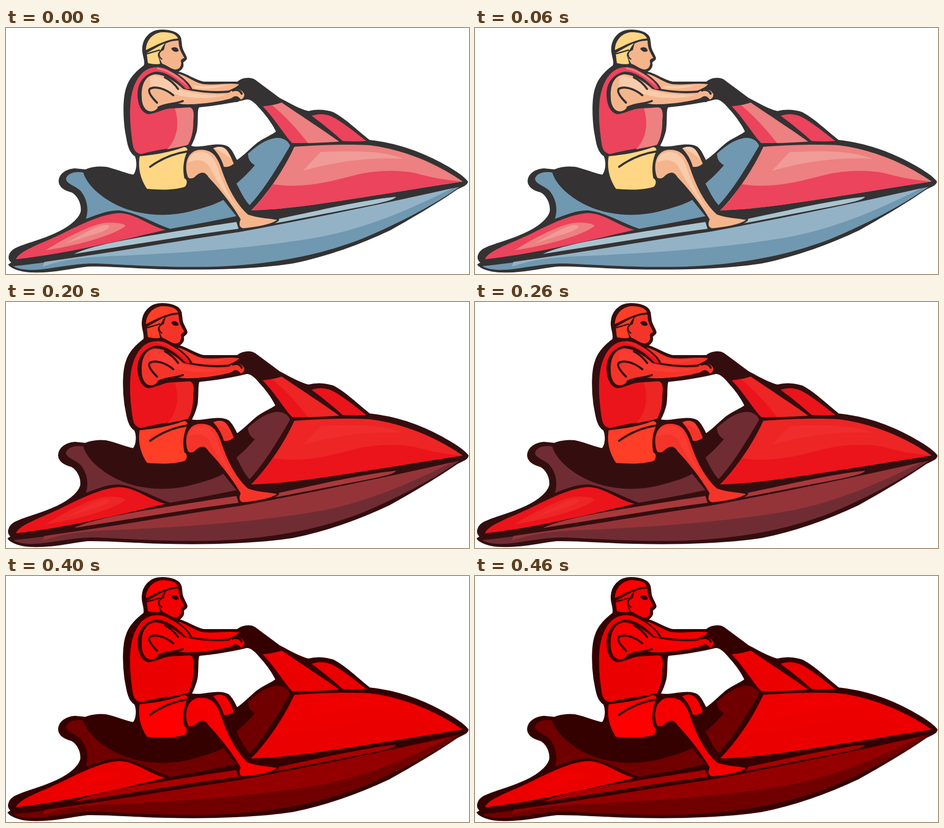
These frames come from a looping animation (880x468 px, 0.5 s). An HTML page:

```html
<!DOCTYPE html>
<html lang="en">
<head>
<meta charset="utf-8">
<title>Jet ski</title>
<style>
html, body { margin: 0; width: 100%; height: 100%; overflow: hidden; background: #fff; }
svg { display: block; width: 880px; height: 468px; }
.ink { fill: var(--ink); }
.red { fill: var(--red); }
.pink { fill: var(--pink); }
.gloss { fill: var(--gloss); }
.skin { fill: var(--skin); }
.glow { fill: var(--glow); }
.hair { fill: var(--hair); }
.blue { fill: var(--blue); }
.sky { fill: var(--sky); }
.pale { fill: var(--pale); }
.line { fill: none; stroke: var(--ink); stroke-width: 4; stroke-linecap: round; stroke-linejoin: round; }
.edge { stroke: var(--ink); stroke-width: 7; stroke-linejoin: round; paint-order: stroke; }
#body { stroke: var(--ink); stroke-linejoin: round; }
</style>
</head>
<body>
<svg viewBox="0 0 880 468">
  <!-- silhouette with the opening under the arms -->
  <path id="body" class="ink" fill-rule="evenodd" d="M296 3C313 3 330 8 333 20L335 36C337 45 344 53 344 58C343 63 337 63 337 67C339 74 334 80 328 83C345 87 360 99 376 102L440 102C447 95 463 92 473 98L520 133C540 143 557 154 575 158C590 154 608 155 622 160C645 172 667 194 691 213C740 218 790 235 834 260C852 270 871 282 878 292C878 299 868 302 858 307C825 330 780 357 730 385C675 411 610 435 545 448C480 458 390 461 300 459C250 458 195 453 155 454C120 458 85 467 50 465C30 465 9 458 4 450L10 446C1 440 5 427 14 421C28 412 60 405 85 394C115 382 138 365 142 349C144 334 135 318 125 313C110 309 100 302 100 291C101 276 116 268 131 267L151 269C165 263 185 262 198 266C213 270 230 277 242 279C249 271 249 253 245 244C231 235 230 215 226 195C222 165 222 130 229 112C234 96 246 83 262 71C265 61 258 52 259 38C260 21 272 3 296 3Z
    M367 151C363 157 366 175 363 195C360 207 356 217 352 224C360 227 373 225 385 223C398 221 414 220 423 226C431 233 434 242 439 251C453 242 464 229 478 218C490 209 504 204 513 197C506 182 494 166 482 153C473 142 465 135 457 136C430 143 395 148 367 151Z"/>

  <!-- hull and side panels -->
  <path class="blue" d="M14 453C130 441 300 408 445 388C590 361 740 329 862 302C830 325 775 358 700 391C620 427 520 449 400 454C300 457 200 448 160 448C110 450 75 462 42 460C27 459 18 456 14 453Z"/>
  <path class="sky" d="M73 445C200 427 320 407 445 388C590 361 735 331 848 305C770 344 695 377 605 396C475 420 320 429 198 434C150 436 110 440 70 454Z"/>
  <path class="pale" d="M129 430C151 419 193 409 250 399C315 388 385 377 438 369L442 382C340 395 225 415 129 430ZM519 363C600 346 675 328 741 321C740 327 708 334 665 342C605 353 545 366 491 375C505 371 520 369 519 363Z"/>
  <path class="blue" d="M114 286C118 276 132 272 147 275C153 297 178 320 207 335C247 356 303 361 350 349C377 342 399 335 413 327L438 358C395 367 352 375 312 382C282 372 248 351 216 347C194 346 174 355 152 363C159 339 151 321 141 309C129 299 114 296 114 286Z"/>
  <path class="blue" d="M460 239C479 222 496 210 516 209C529 209 537 216 540 224C519 260 491 307 463 337C452 325 446 311 438 296C450 286 464 272 473 261C466 257 460 251 460 239Z"/>

  <!-- bodywork -->
  <path class="red" d="M19 440C24 425 62 412 101 394C142 374 180 354 216 352C246 353 274 377 303 384C223 403 116 429 19 440Z"/>
  <path class="pink" d="M75 423C108 402 159 375 187 371C204 369 227 372 227 377C202 396 129 415 75 423Z"/>
  <path class="gloss" d="M113 410C143 394 169 378 187 375C203 374 197 382 181 388Z"/>
  <path class="pink" d="M548 226C603 222 652 221 691 223C752 231 813 254 868 292C796 303 714 317 620 331C560 340 510 346 466 347C490 323 526 275 548 226Z"/>
  <path class="red" d="M507 297C565 306 613 293 663 280C704 270 752 269 785 278C815 286 842 290 868 292C796 303 714 317 620 331C560 340 510 346 466 347C481 333 495 316 507 297Z"/>
  <path class="gloss" d="M598 236C650 234 710 231 756 249C698 245 623 254 564 272Z"/>
  <path class="red" d="M488 149C502 147 514 146 524 142C559 166 598 191 633 216C602 219 570 219 544 219C529 204 513 175 488 149Z"/>
  <path class="pink" d="M506 147L524 142C559 166 598 191 633 216L574 219C556 195 532 169 506 147Z"/>
  <path class="red" d="M581 167C602 160 618 166 634 177C654 190 670 204 685 215C669 216 655 216 640 215C621 198 600 181 581 167Z"/>

  <!-- head -->
  <path class="hair" d="M266 42C266 23 280 9 297 8C311 8 323 10 327 20C307 21 284 33 266 42ZM267 48C279 41 291 34 302 29C297 36 295 39 293 44C287 47 288 54 291 59L293 68C284 70 277 68 270 67C268 61 269 54 267 48Z"/>
  <path class="skin" d="M303 30C309 26 319 24 328 24C328 39 333 46 339 57C333 59 331 61 333 66C333 75 328 79 321 79C312 77 304 70 297 68C294 63 293 59 290 55C289 47 295 44 300 42Z"/>
  <path class="line" d="M268 49L292 42M295 43C288 48 291 56 296 59" style="stroke-width:2.5"/>
  <path class="ink" d="M314 39C320 34 328 37 328 44C323 47 317 45 314 39Z"/>

  <!-- life vest and arms -->
  <path class="red" d="M236 151C237 121 246 96 262 83C276 72 297 72 312 82C331 92 344 103 350 116L342 116C326 99 306 83 285 83C265 86 250 103 250 125C250 144 256 160 270 164C286 163 297 154 313 153L349 151C358 153 357 165 356 177C356 197 352 212 346 222C320 228 284 232 256 240C246 237 243 232 241 222C237 196 235 172 236 151Z"/>
  <path class="pink" d="M321 153C330 182 326 210 306 231C323 227 339 225 346 222C352 212 356 197 356 177C357 165 358 153 349 151ZM287 75C311 79 334 94 346 112C326 95 309 82 287 78Z"/>
  <path class="skin" d="M326 87C340 88 357 104 376 107C401 109 421 104 443 107C439 112 432 115 423 119C400 121 377 120 354 116C350 105 337 95 326 87Z"/>
  <path class="skin" d="M258 130C257 106 266 90 284 88C303 89 321 102 337 116C366 123 398 126 424 123C433 114 447 114 453 126C453 132 450 135 446 136C443 129 432 131 427 134C403 141 365 146 337 145C323 142 304 144 289 151C281 162 268 160 263 151C259 145 258 138 258 130Z"/>
  <path class="glow" d="M274 93C293 86 313 103 328 116C355 126 389 128 419 127C388 137 344 134 318 125C303 114 287 111 274 113ZM358 109C374 112 397 111 421 108C399 116 378 117 358 114Z"/>
  <path class="line" d="M287 142C277 132 269 122 273 116C283 109 304 116 318 128M302 94C311 98 321 107 327 116M290 151C306 143 322 145 336 139M431 119C439 116 445 119 448 125"/>
  <path class="ink" d="M429 134C433 128 442 128 445 136L440 141H430Z"/>

  <!-- shorts and legs -->
  <path class="hair" d="M254 244C285 241 313 236 337 227C344 226 346 231 344 236C336 254 336 272 339 286C346 289 344 298 340 302C320 309 290 308 268 306C257 290 250 269 254 244Z"/>
  <path class="line" d="M274 264C293 250 318 239 344 235"/>
  <path class="skin" d="M394 229C404 224 414 225 420 233C427 242 430 252 433 258C426 264 420 265 414 264C410 250 404 240 394 229Z"/>
  <path class="glow" d="M394 229C404 224 414 225 420 233L429 250C418 241 408 234 394 229Z"/>
  <path class="skin edge" d="M346 284C338 263 343 236 365 232C390 230 400 241 409 267C421 303 437 334 460 355C477 361 496 362 515 365C506 373 480 378 451 381C442 379 443 371 446 364C433 341 410 310 385 284C377 270 367 275 358 284C353 287 349 287 346 284Z"/>
  <path class="glow" d="M365 236C386 233 397 247 405 274C416 305 431 333 449 353C432 337 406 302 390 270C382 253 369 246 346 256C348 246 354 238 365 236Z"/>
</svg>
<script>
const palette = {
  ink: [52, 50, 51], red: [235, 68, 92], pink: [237, 128, 128], gloss: [240, 155, 152],
  skin: [245, 181, 140], glow: [249, 203, 170], hair: [254, 214, 132],
  blue: [112, 152, 176], sky: [148, 178, 198], pale: [169, 196, 208]
};
const tints = [1, 0.72, 0.29, 0.05, 0];
const root = document.documentElement;
const body = document.getElementById('body');

// Each step drains green and blue while red stays.
function draw(now) {
  const step = Math.floor(now / 100) % tints.length;
  const k = tints[step];
  for (const name in palette) {
    const [r, g, b] = palette[name];
    root.style.setProperty('--' + name, `rgb(${r},${Math.round(g * k)},${Math.round(b * k)})`);
  }
  body.style.strokeWidth = step < 2 ? 0 : 2;
  requestAnimationFrame(draw);
}
draw(0);
</script>
</body>
</html>
```
